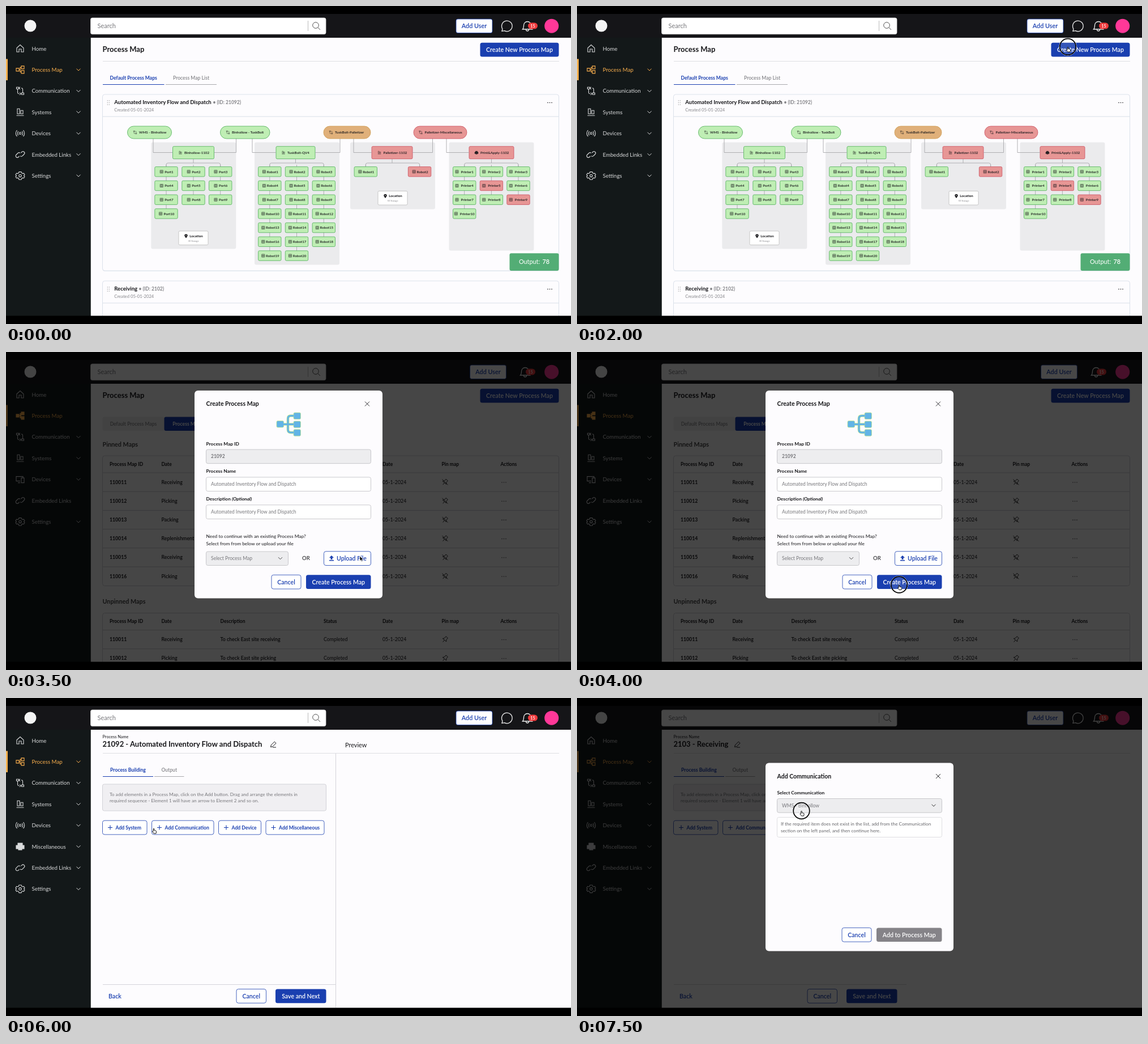
An HTML page that plays this animation: 998 px wide and 561 px high, repeating every 8 s.

```html
<!DOCTYPE html>
<html lang="en">
<head>
<meta charset="utf-8">
<title>Process map walkthrough</title>
<style>
html, body { margin: 0; width: 100%; height: 100%; overflow: hidden; background: #000; }
svg { display: block; width: 998px; height: 561px; font-family: Lato, "Open Sans", sans-serif; }
</style>
</head>
<body>
<svg id="stage" viewBox="0 0 998 561"></svg>
<script>
const BLUE = '#1a3fb0', GREY = '#858589', INK = '#17171a', PAPER = '#fdfcfe', AMBER = '#fbb04e';
const TONES = {
  green: ['#bfeeb4', '#4fae58'],
  amber: ['#e0b07a', '#cc9a50'],
  red: ['#e79695', '#cc5060']
};

// Drawing helpers
const text = (x, y, s, size = 8.6, fill = INK, weight = 400, more = '') =>
  `<text x="${x}" y="${y}" font-size="${size}" fill="${fill}" font-weight="${weight}" ${more}>${s}</text>`;
const mid = (x, y, s, size, fill, weight) => text(x, y, s, size, fill, weight, 'text-anchor="middle"');
const rect = (x, y, w, h, fill, stroke = 'none', r = 0, more = '') =>
  `<rect x="${x}" y="${y}" width="${w}" height="${h}" rx="${r}" fill="${fill}" stroke="${stroke}" stroke-width=".8" ${more}/>`;
const path = (d, stroke, width = 1, fill = 'none', more = '') =>
  `<path d="${d}" stroke="${stroke}" stroke-width="${width}" fill="${fill}" ${more}/>`;
const circle = (x, y, r, fill, stroke = 'none', width = 1) =>
  `<circle cx="${x}" cy="${y}" r="${r}" fill="${fill}" stroke="${stroke}" stroke-width="${width}"/>`;
const at = (x, y, body, more = '') => `<g transform="translate(${x} ${y}) ${more}">${body}</g>`;
const chevron = (x, y, color) => path(`M${x - 3.5} ${y - 1.8}l3.5 3.5 3.5-3.5`, color, 1);
const cross = (x, y) => path(`M${x - 4} ${y - 4}l8 8m0-8l-8 8`, INK, 0.9);
const more = (x, y, color = INK) => [-3.5, 0, 3.5].map(d => circle(x + d, y, 0.8, color)).join('');
const button = (x, y, w, label, solid, fill = BLUE) =>
  rect(x, y, w, 24.7, solid ? fill : '#fff', solid ? 'none' : BLUE, 3.5) +
  mid(x + w / 2, y + 16.2, label, 10.6, solid ? '#fff' : BLUE, 600);

const ICONS = {
  home: 'M-6-1L0-6.500L6-1V6H2V1H-2V6H-6Z',
  process: 'M-7-2.500h5v5h-5zM2-6.500h5v5h-5zM2 1.500h5v5h-5zM-2 0H0M2-4H0V4H2',
  comm: 'M-4.500-3V2.500a2.500 2.500 0 0 0 2.500 2.500M4.500 3V-2.500a2.500 2.500 0 0 0-2.500-2.500M-6.500-6.500h4v3h-4zM2.500 3.500h4v3h-4zM0-7l-2 2 2 2M-1 7l2-2-2-2',
  systems: 'M-5-6h4v9h-4zM1-3h4v6h-4zM-6.500 6H6.500',
  signal: 'M-1.800 0a1.800 1.800 0 1 0 3.600 0a1.800 1.800 0 1 0-3.600 0M-3.200-3.500a5 5 0 0 0 0 7M3.200-3.500a5 5 0 0 1 0 7M-5.500-5.500a8 8 0 0 0 0 11M5.500-5.500a8 8 0 0 1 0 11',
  monitor: 'M0 3H-7V-5H5V-3M-4 6H0M2-2.500h5v8.500h-5z',
  link: 'M-1.500 3l-1.500 1.500a2.700 2.700 0 0 1-4-4l3-3a2.700 2.700 0 0 1 4 0M1.500-3l1.500-1.500a2.700 2.700 0 0 1 4 4l-3 3a2.700 2.700 0 0 1-4 0',
  gear: 'M-2-6.800h4l.7 2 1.800 1 2-.5 1.500 2.600-1.500 1.700 1.500 1.700-1.500 2.600-2-.5-1.800 1-.7 2h-4l-.7-2-1.800-1-2 .5-1.500-2.600 1.500-1.700-1.500-1.700 1.500-2.600 2 .5 1.800-1zM-2.200 0a2.200 2.200 0 1 0 4.400 0a2.200 2.200 0 1 0-4.400 0',
  printer: 'M-4-6H4V-3H-4ZM-7-2H7V4H4V2H-4V4H-7ZM-3 3H3V6H-3Z'
};
const icon = (name, x, y, color, scale = 1, filled = name === 'printer') =>
  at(x, y, path(ICONS[name], color, 1.1, filled ? color : 'none'), `scale(${scale})`);

// Page frame
function header(style) {
  const compact = style === 'list';
  const addX = compact ? 819.5 : 795, bellX = compact ? 917 : 921;
  return rect(0, 14, 998, 42, '#151518') + circle(43, 35, 10.5, '#f4f4f4') +
    rect(149.5, 21, 415.5, 28.7, '#fff', '#ddd', 3) + text(161.5, 39, 'Search', 11, '#77777b') +
    path('M533.5 26V44', '#bbb') + circle(547, 34, 5.3, 'none', '#555') + path('M551 38l4 4', '#555') +
    rect(addX, 23, 64, 24.5, '#fff', BLUE, 3) + mid(addX + 32, 39, 'Add User', 10.8, BLUE, 600) +
    (compact ? '' : path('M876 44.500l1-4a9.300 9.300 0 1 1 3.500 3.200z', '#eee', 1.3)) +
    at(bellX, 35, path('M-8.500 6c2-2 2-4 2-7a6.500 6.500 0 0 1 13 0c0 3 0 5 2 7zM-2.500 6.500a2.500 2.500 0 0 0 5 0', '#eee', 1.3)) +
    rect(bellX + 1, 29.5, 17, 11, '#ee3a3c', 'none', 5.5) + mid(bellX + 9.5, 37.6, '15', 7.2, '#fff', 600) +
    circle(963.7, 35.2, 12.5, '#ff3898');
}

function sidebar(style) {
  const items = [['Home', 'home'], ['Process Map', 'process'], ['Communication', 'comm'], ['Systems', 'systems'],
    ['Devices', style === 'list' ? 'monitor' : 'signal'], ['Embedded Links', 'link'], ['Settings', 'gear']];
  if (style === 'build') items.splice(5, 0, ['Miscellaneous', 'printer']);
  const plain = style === 'list' ? ['Home', 'Process Map', 'Embedded Links'] : ['Home'];
  return rect(0, 56, 149.5, 491, '#131819') + rect(0, 93.5, 3, 37.5, AMBER) + items.map(([label, name], i) => {
    const y = 75 + i * 37.4, color = i === 1 ? AMBER : '#d9dadb';
    return icon(name, 25, y, color, 1, name === 'printer' || (style === 'list' && i === 1)) +
      text(45.5, y + 3.5, label, 9.7, color) + (plain.includes(label) ? '' : chevron(128, y, color));
  }).join('');
}

const shell = (style, body) => rect(0, 0, 998, 561, '#000') + rect(149.5, 56, 848.5, 491, PAPER) +
  body + header(style) + sidebar(style) + rect(0, 546.5, 998, 15, '#000');
const dim = rect(0, 0, 998, 561, '#000', 'none', 0, 'opacity=".72"');
const rule = path('M171 97.500H977', '#dedee3');
const pageTitle = text(170.5, 81, 'Process Map', 13, INK, 700) + button(837.5, 64.7, 139, 'Create New Process Map', true);
const tab = (x, w, label, active) => mid(x + w / 2, 129.5, label, 8.6, active ? BLUE : GREY, active ? 700 : 600) +
  path(`M${x} 138.500h${w}`, active ? BLUE : '#a9a9ad', 1.2);

// Dashboard
const tag = (x, y, w, h, r, tone, tx, label, name) =>
  rect(x, y, w, h, TONES[tone][0], TONES[tone][1], r) + icon(name, tx - 7, y + h / 2, INK, 0.42) +
  text(tx, y + h / 2 + 2.2, label, 6.2, INK, 600);

function cell(cx, y, label, bad) {
  const [fill, line] = TONES[bad ? 'red' : 'green'];
  const ix = cx - label.length * 1.65;
  return rect(cx - 20.2, y - 8.7, 40.4, 17.4, fill, line, 2) +
    at(ix, y, path('M-2.500-2.500h5v5h-5zM-2.500 0h5M-1-1.300h2M-1 1.300h2', INK, 0.6)) +
    mid(cx + 5, y + 2.2, label, 6.2, INK, 600);
}

function group(g) {
  const { x, h, node, cols, word, count, bad = [] } = g;
  const cx = node[0] + node[1] / 2, last = cols.length - 1, rowY = r => 292.3 + r * 24.7;
  let wires = `M${cx} 270V277M${cols[0]} 290V280q0-3 3-3H${cols[last] - 3}q3 0 3 3V290`, cells = '';
  cols.forEach((c, i) => {
    const rows = Math.ceil((count - i) / cols.length);
    wires += `M${c} 280V${rowY(rows - 1)}`;
  });
  for (let i = 0; i < count; i++)
    cells += cell(cols[i % cols.length], rowY(Math.floor(i / cols.length)), word + (i + 1), bad.includes(i + 1));
  return rect(x, 240.5, 150, h, '#ebebed', 'none', 3) + path(wires, '#a9a9ac', 0.9) + cells +
    tag(node[0], 247.7, node[1], 22, 2, ...node.slice(2));
}

function place(cx, y, label) {
  return rect(cx - 26, y, 52, 24.5, '#fff', '#bbb', 2) +
    at(cx - 13, y + 9, path('M0 3.500C-5-2-2-3.500 0-3.500S5-2 0 3.500z', 'none', 0, INK) + circle(0, -1, 0.8, '#fff')) +
    mid(cx + 5, y + 10.7, 'Location', 6.2, INK, 700) + mid(cx, y + 18.5, label, 4, GREY);
}

function card(y, h, title, id, idX) {
  let dots = '';
  for (let i = 0; i < 6; i++) dots += circle(179.3 + (i % 2) * 3, y + 11 + Math.floor(i / 2) * 3.5, 0.65, '#999');
  return rect(170.5, y + 1, 806, h, '#e9edf2', 'none', 4) + rect(170.5, y, 806, h, PAPER, '#d3dbe6', 4) +
    path(`M171 ${y + 39}H976`, '#d9dfe8') + dots + text(191.3, y + 17, title, 9.55, INK, 700) +
    text(idX, y + 17, `• (ID: ${id})`, 8.5, GREY, 700) + text(191.3, y + 30, 'Created 05-01-2024', 7.7, GREY) +
    more(960.5, y + 14.5);
}

const groups = [
  { x: 256.3, h: 188, node: [294.5, 73, 'green', 315, 'Binhollow-1102', 'systems'], cols: [283, 331, 378.7], word: 'Port', count: 10 },
  { x: 439, h: 216, node: [477, 69, 'green', 497, 'TuskBolt-QV4', 'systems'], cols: [465.8, 513.5, 561.3], word: 'Robot', count: 20 },
  { x: 608, h: 118, node: [646, 72, 'red', 666.5, 'Palletizer-1102', 'systems'], cols: [635.3, 730.6], word: 'Robot', count: 2, bad: [2] },
  { x: 782.5, h: 191, node: [818, 79, 'red', 838, 'Print&amp;Apply-1102', 'printer'], cols: [809.7, 857.4, 905], word: 'Printer', count: 10, bad: [5, 9] }
];
const dashboard = shell('dash', pageTitle + rule + tab(171, 108.5, 'Default Process Maps', true) +
  tab(282, 90, 'Process Map List') + card(156, 311, 'Automated Inventory Flow and Dispatch', 21092, 365.5) +
  groups.map(group).join('') +
  path('M260 234V258.500H294M406.500 234V258.500H368M435 234V258.500H477M590 234V258.500H546M614 234V258.500H646M753.500 234V258.500H718M778 234V258.500H818', '#a9a9ac', 0.9) +
  tag(214.5, 212, 78, 22, 11, 'green', 235, 'WMS - Binhollow', 'comm') +
  tag(378.5, 212, 87.5, 22, 11, 'green', 399, 'Binhollow - TuskBolt', 'comm') +
  tag(561, 212, 83, 22, 11, 'amber', 581, 'TuskBolt-Palletizer', 'comm') +
  tag(720, 212, 94, 22, 11, 'red', 739.5, 'Palletizer-Miscellaneous', 'comm') +
  place(331, 397, '30 Storage') + place(683, 326.5, '50 Storage') +
  rect(889.5, 436.3, 87, 30.7, '#53ad75', 'none', 3) + text(906, 455.3, 'Output:', 10.8, '#fff') +
  text(947.5, 455.3, '78', 10.8, '#fff', 600) + card(485, 90, 'Receiving', 2102, 234.5));

// Map list
const pin = (x, y, off) => at(x, y, path('M-2.200-5h4.400v4l2 2.500h-8.400l2-2.500zM0 1.500V6', '#222', 0.9), 'rotate(40)') +
  (off ? path(`M${x - 5} ${y - 5}l10 10`, '#222', 0.9) : '');
const columns = [183, 274.5, 378.5, 561, 665, 769.5, 873.5];

function table(y, title, rows, off) {
  const heads = ['Process Map ID', 'Date', 'Description', 'Status', 'Date', 'Pin map', 'Actions'];
  return text(170.5, y - 16.5, title, 10.8, '#444', 700) +
    rect(170.5, y, 806, 30 + rows.length * 33.25, PAPER, '#c4c4ca', 4) +
    heads.map((h, i) => text(columns[i], y + 17.5, h, 8.5, INK, 700)).join('') +
    rows.map(([name, note], i) => {
      const base = y + 49.5 + i * 33.2;
      return path(`M171 ${y + 30 + i * 33.2}H976`, '#c9c9cf') + text(183, base, 110011 + i, 8.7, INK, 700) +
        text(columns[1], base, name, 8.8, INK, 600) +
        (note ? text(columns[2], base, note, 8.8, INK, 600) + text(columns[3], base, 'Completed', 8.8) : '') +
        text(columns[4], base, '05-1-2024', 8.8) + pin(775.5, base - 3, off) + more(879.5, base - 2.5, '#555');
    }).join('');
}

const list = shell('list', pageTitle + rect(170.5, 114.5, 110, 24.5, '#eee', 'none', 3) +
  mid(225, 129.7, 'Default Process Maps', 8.6, GREY, 600) + rect(279.5, 114.5, 94, 24.5, BLUE, 'none', 3) +
  mid(326.5, 129.7, 'Process Map List', 8.6, '#fff', 700) +
  table(183, 'Pinned Maps', ['Receiving', 'Picking', 'Packing', 'Replenishment', 'Receiving', 'Picking'].map(n => [n]), true) +
  table(460.5, 'Unpinned Maps', [['Receiving', 'To check East site receiving'], ['Picking', 'To check East site picking'], ['Packing', '']]));

// Dialogs
const dialog = (y, h, title, body) => dim + rect(333, y, 332, h, PAPER, 'none', 6) +
  text(353.5, y + 27.3, title, 10.5, INK, 700) + cross(638, y + 23.5) + body;
const field = (y, label, value, filled, weight) => text(353.5, y - 7.5, label, 8.4, INK, 700) +
  rect(353.5, y, 291, 24.7, filled ? '#ededef' : '#fff', '#bdbdc1', 3) + text(362, y + 15.3, value, 8.5, '#77777b', weight);

const emblemShape = 'M490 127.500H508M508 112.500H503q-5 0-5 5V137q0 5 5 5H508';
const emblemBoxes = [[478, 121.5], [508, 107], [508, 122], [508, 136.7]];
const emblem = path(emblemShape, '#c0e58c', 4.6) +
  emblemBoxes.map(([x, y]) => rect(x, y, 12.5, 11.5, '#62b4e6', '#c0e58c', 2)).join('') + path(emblemShape, '#62b4e6', 3);

const createDialog = list + dialog(68, 366.5, 'Create Process Map', emblem +
  field(172, 'Process Map ID', '21092', true, 700) +
  field(220.9, 'Process Name', 'Automated Inventory Flow and Dispatch') +
  field(269.8, 'Description <tspan font-style="italic">(Optional)</tspan>', 'Automated Inventory Flow and Dispatch') +
  text(353.5, 327.7, 'Need to continue with an existing Process Map?', 8.4) +
  text(353.5, 340.5, 'Select from from below or upload your file', 8.4) +
  rect(353.5, 352, 145, 24.5, '#ededef', '#bdbdc1', 3) + text(362, 367, 'Select Process Map', 8.6, '#77777b') +
  chevron(484.5, 364, '#444') + text(523, 367.3, 'OR', 9.7) + rect(561.5, 351.8, 83, 24.7, '#fff', BLUE, 3.5) +
  path('M575 359l4 4h-2.500v3h-3v-3h-2.500zM571 367h8v1.500h-8z', 'none', 0, BLUE) +
  text(584, 368, 'Upload File', 10.6, BLUE, 600) +
  button(469, 393.3, 52, 'Cancel') + button(530, 393.3, 114.5, 'Create Process Map', true));

// Builder
function builder(title, pencilX, preview) {
  const adds = [[170.5, 78.5, 'System'], [257.5, 109.5, 'Communication'], [375.5, 75, 'Device'], [459, 103, 'Miscellaneous']];
  return shell('build', text(170.5, 71, 'Process Name', 7.4) + text(170.5, 86, title, 13, INK, 700) +
    at(pencilX, 82, path('M-4.500 4.500l.8-3.500 6-6 2.700 2.700-6 6zM-1 5H5', INK, 1)) + rule +
    (preview ? text(599, 87, 'Preview', 10.9) + path('M582.500 98V546', '#d4d4da') : '') +
    tab(171, 89, 'Process Building', true) + tab(262, 52.5, 'Output') +
    rect(170.5, 152, 395, 47, '#f0eff2', '#c9c9ce', 3) +
    text(183, 172.7, 'To add elements in a Process Map, click on the Add button. Drag and arrange the elements in', 8.2, '#77777b') +
    text(183, 184.2, 'required sequence - Element 1 will have an arrow to Element 2 and so on.', 8.2, '#77777b') +
    adds.map(([x, w, s]) => rect(x, 216.2, w, 24.7, '#fff', BLUE, 3.5) +
      path(`M${x + 9.5} 228.500h8m-4-4v8`, BLUE, 1.1) + text(x + 23, 231.5, 'Add ' + s, 8.6, BLUE, 700)).join('') +
    path('M171 505.500H582', '#d4d4da') + text(181, 529.7, 'Back', 10.6, BLUE, 600) +
    button(407, 513.5, 52.5, 'Cancel') + button(476, 513.5, 89.5, 'Save and Next', true));
}

const build = builder('21092 - Automated Inventory Flow and Dispatch', 472, true);
const addDialog = builder('2103 - Receiving', 283) + dialog(114.5, 332, 'Add Communication',
  field(177.5, 'Select Communication', 'WMS - Binhollow', true) + chevron(630, 189.5, '#333') +
  rect(353.5, 210.5, 291, 35, '#fff', '#d6d6da', 3) +
  text(360, 225.3, 'If the required item does not exist in the list, add from the Communication', 8.2, '#66666a') +
  text(360, 236.8, 'section on the left panel, and then continue here.', 8.2, '#66666a') +
  button(468, 405.4, 52, 'Cancel') + button(529, 405.4, 115.5, 'Add to Process Map', true, '#858388'));

// Pointer
const arrow = path('M0 0V8.500L2 6.700L3.300 9.500L4.700 8.900L3.400 6.200H6z', '#fff', 0.7, '#000');
const hand = path('M-.8 .8q.8-1 1.600 0V3.500l3 .8q1 .4.800 1.500L4 9H0L-2.500 5.500q0-1 1.700-.4z', '#000', 0.9, '#fff');
const ring = circle(0, 0, 15.3, 'none', '#fff', 1) + circle(0, 0, 14.3, 'rgba(255,255,255,.12)', '#000', 1.7);
const press = ring + hand;

const STEP = 500, LOOP = 8000;
const pointer = [
  null, null, [690, 330, arrow], [826, 126, arrow], [867, 72, press],
  [865.5, 71.5, arrow], [800, 165, arrow], [625, 360, arrow], [569, 410.5, press],
  [569.5, 409.5, arrow], [540, 388, arrow], [370, 290, arrow], [261, 230, hand],
  [291, 229, arrow], [355, 210, arrow], [396.5, 199, press]
];
const sceneAt = i => i < 5 ? dashboard : i < 9 ? createDialog : i < 13 ? build : addDialog;

const stage = document.getElementById('stage');
let shown = -1;
function draw() {
  const i = Math.floor(performance.now() % LOOP / STEP);
  if (i !== shown) {
    shown = i;
    stage.innerHTML = sceneAt(i) + (pointer[i] ? at(...pointer[i]) : '');
  }
  requestAnimationFrame(draw);
}
draw();
</script>
</body>
</html>
```
